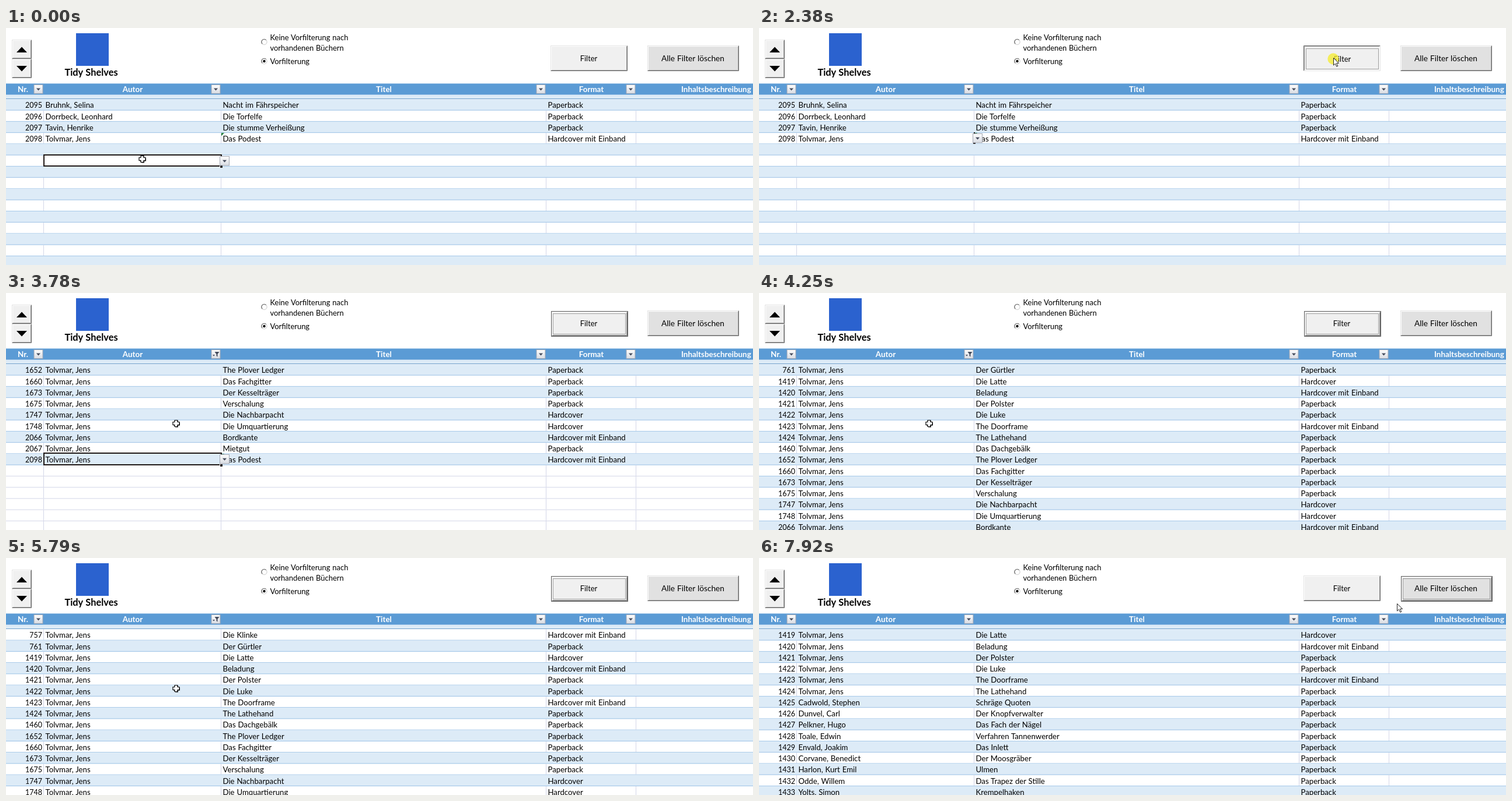
Write an HTML page that moves like this. It is 1280x407 px and loops after 8 s.

```html
<!DOCTYPE html>
<html lang="de">
<head>
<meta charset="utf-8">
<title>Library table</title>
<style>
html, body { margin: 0; width: 100%; height: 100%; overflow: hidden; background: #fff; }
svg { display: block; width: 100vw; height: 100vh; }
text { font: 13.2px Lato, Carlito, sans-serif; fill: #000; word-spacing: .5px; }
.num { font-size: 12.5px; text-anchor: end; }
.label { font-size: 12.95px; }
.head { font-size: 13.4px; font-weight: bold; fill: #fff; }
.mid { text-anchor: middle; }
.brand { font-size: 16.4px; font-weight: bold; }
</style>
</head>
<body>
<svg viewBox="0 0 1280 407" xmlns="http://www.w3.org/2000/svg">
  <defs>
    <linearGradient id="knob" x2="0" y2="1">
      <stop stop-color="#fdfdfd"/><stop offset="1" stop-color="#d9dce3"/>
    </linearGradient>
  </defs>
  <rect width="1280" height="407" fill="#fff"/>
  <g id="table"></g>
  <g id="top"></g>
  <g id="pointer"></g>
</svg>
<script>
const LOOP = 8000;
const COLUMNS = [64, 368, 925, 1079];
const BAND = '#ddebf7', BORDER = '#9bc2e6', GRID = '#d3d6e8';
const P = 'Paperback', H = 'Hardcover', E = 'Hardcover mit Einband';
const AUTHOR = 'Tolvmar, Jens';

const recent = [
  [2095, 'Bruhnk, Selina', 'Nacht im Fährspeicher', P],
  [2096, 'Dorrbeck, Leonhard', 'Die Torfelfe', P],
  [2097, 'Tavin, Henrike', 'Die stumme Verheißung', P],
  [2098, AUTHOR, 'Das Podest', E]
];
const filtered = [
  [630, 'Die Elle', P], [757, 'Die Klinke', E], [761, 'Der Gürtler', P],
  [1419, 'Die Latte', H], [1420, 'Beladung', E], [1421, 'Der Polster', P],
  [1422, 'Die Luke', P], [1423, 'The Doorframe', E], [1424, 'The Lathehand', P],
  [1460, 'Das Dachgebälk', P], [1652, 'The Plover Ledger', P],
  [1660, 'Das Fachgitter', P], [1673, 'Der Kesselträger', P],
  [1675, 'Verschalung', P], [1747, 'Die Nachbarpacht', H],
  [1748, 'Die Umquartierung', H], [2066, 'Bordkante', E],
  [2067, 'Mietgut', P], [2098, 'Das Podest', E]
].map(([nr, title, format]) => [nr, AUTHOR, title, format]);
const cleared = filtered.slice(3, 9).concat([
  ['Cadwold, Stephen', 'Schräge Quoten'],
  ['Dunvel, Carl', 'Der Knopfverwalter'],
  ['Pelkner, Hugo', 'Das Fach der Nägel'],
  ['Toale, Edwin', 'Verfahren Tannenwerder'],
  ['Envald, Joakim', 'Das Inlett'],
  ['Corvane, Benedict', 'Der Moosgräber'],
  ['Harlon, Kurt Emil', 'Ulmen'],
  ['Odde, Willem', 'Das Trapez der Stille'],
  ['Yolts, Simon', 'Krempelhaken']
].map(([author, title], i) => [1425 + i, author, title, P]));

// Each step holds until the next one: [ms, ...values]
const scroll = [[0, 15], [3510, 13], [3610, 11], [3780, 10], [3900, 8], [4120, 5],
  [4250, 2], [4370, 1], [4870, 0], [5790, 1], [5930, 3]];
const pointer = [
  [0, 233, 225], [490, 230, 215], [610, 224, 197], [730, 220, 189],
  [1360, 400, 172], [1470, 640, 136], [1610, 780, 108], [1730, 920, 62],
  [1850, 986, 35, 1], [1970, 984, 51, 1], [2920, 900, 78], [3030, 640, 130],
  [3140, 420, 185], [3250, 320, 212], [3360, 299, 216], [3510, 291, 224],
  [6390, 330, 218], [6510, 560, 180], [6640, 900, 125], [6770, 1090, 86],
  [6890, 1127, 72, 1], [7050, 1130, 63, 1], [7920, 1093, 78, 1]
];
const clicks = [[850, 1000], [2270, 2470], [7410, 7680]];

const at = (steps, t) => steps.filter(s => s[0] <= t).pop();
const within = (t, from, to) => t >= from && t < to;
const line = i => 121.9 + 19.25 * i;
const edge = i => Math.round(line(i) - .5);

const box = (x, y, w, h, fill, extra = '') =>
  `<rect x="${x}" y="${y}" width="${w}" height="${h}" fill="${fill}" ${extra}/>`;
const path = (d, fill, extra = '') => `<path d="${d}" fill="${fill}" ${extra}/>`;
const text = (x, y, s, cls = '') => `<text x="${x}" y="${y}" class="${cls}">${s}</text>`;
const outline = color => `stroke="${color}"`;

function knob(x, y, w, h, funnel) {
  const cx = x + w / 2, cy = y + h / 2;
  const icon = funnel
    ? path(`M${cx - 2} ${cy - 4}h8l-3 4v4.5l-2 -1.5v-3z`, '#444b5c') +
      path(`M${cx - 5.5} ${cy + 1}h4l-2 2.5z`, '#444b5c')
    : path(`M${cx - 3.5} ${cy - 1.5}h7l-3.5 4z`, '#444b5c');
  return box(x, y, w, h, 'url(#knob)', outline('#a3a8b3')) + icon;
}

function bevel(x, y, w, h, fill, sunken) {
  const r = x + w, b = y + h;
  const light = ['#e3e3e3', '#fff'], dark = ['#696969', '#a0a0a0'];
  const [tl, br] = sunken ? [dark, light] : [light, dark];
  const ring = i => {
    const d = i + .5;
    return path(`M${x + d} ${b - d}V${y + d}H${r - d}`, 'none', outline(tl[i])) +
      path(`M${x + d} ${b - d}H${r - d}V${y + d}`, 'none', outline(br[i]));
  };
  return box(x, y, w, h, fill) + ring(0) + ring(1);
}

function button(x, w, label, fill, size, state) {
  const pressed = state === 'pressed', focused = state === 'focus';
  const shift = pressed ? 1 : 0;
  let s = focused
    ? bevel(x + 2, 32, w - 2, 42, fill) + box(x + 1.5, 31.5, w - 1, 43, 'none', outline('#646464'))
    : bevel(x, 30, w, 44, fill, pressed);
  if (state)
    s += box(x + 4.5, 35.5, w - 8, 35, 'none', 'stroke="#555" stroke-dasharray="1 1"');
  return s + `<text x="${x + w / 2 - .5 + shift}" y="${57 + shift}" class="mid" style="font-size:${size}px">${label}</text>`;
}

function radio(y, on) {
  return `<circle cx="442.5" cy="${y}" r="4.6" fill="#fff" stroke="#c8c8c8"/>` +
    path(`M439.2 ${y + 3.3}A4.6 4.6 0 0 1 445.8 ${y - 3.3}`, 'none', 'stroke="#666" stroke-width="1.2"') +
    (on ? `<circle cx="442.5" cy="${y}" r="2.2" fill="#000"/>` : '');
}

function drawTop(t) {
  const filterOn = within(t, 2470, 7680);
  const filterState = within(t, 2380, 2470) ? 'pressed' : within(t, 2470, 7530) ? 'focus' : '';
  const clearState = within(t, 7530, 7680) ? 'pressed' : t >= 7680 ? 'focus' : '';
  return bevel(10, 20, 34, 33, '#f0f0f0') + path('M18 42L27 32.5L36 42z', '#000') +
    bevel(10, 53, 34, 33, '#f0f0f0') + path('M18 65H36L27 74.5z', '#000') +
    box(120, 9, 56, 56, '#2b62cf') +
    text(146, 82, 'Tidy Shelves', 'brand mid') +
    radio(24, false) + radio(57, true) +
    text(452.5, 21, 'Keine Vorfilterung nach', 'label') +
    text(452.5, 39, 'vorhandenen Büchern', 'label') +
    text(452.5, 62, 'Vorfilterung', 'label') +
    button(933, 132, 'Filter', '#f0f0f0', 12.9, filterState) +
    button(1099, 157, 'Alle Filter löschen', '#e1e1e1', 13.7, clearState) +
    box(0, 95, 1280, 20, '#5b9bd5') + box(0, 95, 1280, 1, BORDER) +
    box(0, 115, 1280, 6, BAND) + box(0, 114, 1280, 1, BORDER) + box(0, 121, 1280, 1, '#6f9fcb') +
    [['Nr.', 29], ['Autor', 217], ['Titel', 647.5], ['Format', 1003]]
      .map(([s, x]) => text(x, 110, s, 'head mid')).join('') +
    text(1157, 110, 'Inhaltsbeschreibung', 'head') +
    [55.5, 359.5, 916.5, 1070.5]
      .map((x, i) => knob(x - 7.5, 97.5, 15, 15, i === 1 && filterOn)).join('');
}

function drawRow(i, cells, banded, plain) {
  const y = line(i) + .5, end = line(i + 1) - .5, base = edge(i) + 15.5;
  let s = banded ? box(0, y, 1280, end - y + .5, BAND)
    : COLUMNS.map(x => box(x, y, 1, end - y, GRID)).join('');
  s += box(0, end, 1280, 1, plain ? GRID : BORDER);
  if (!cells) return s;
  const [nr, author, title, format] = cells;
  if (nr === 2098) s += path(`M369 ${y}h5l-5 5z`, '#1e7a34');
  return s + text(62, base, nr, 'num') + text(67.5, base, author) +
    text(371.5, base, title) + text(928.5, base, format);
}

function drawSelection(row, framed) {
  const a = edge(row), b = edge(row + 1), dark = '#211a18';
  const frame = framed
    ? box(65, a, 304, b - a, 'none', `stroke="${dark}" stroke-width="2"`) +
      box(366, b - 2, 5, 5, '#fff') + box(367, b - 1, 4, 4, dark)
    : box(367, b - 2, 4, 3, dark) + box(368, a, 2, 2, dark);
  return frame + knob(366.5, a + 2.5, 16, 15.5);
}

function drawTable(t) {
  const isFiltered = within(t, 2470, 7680);
  const first = isFiltered ? at(scroll, t)[1] : 0;
  const rows = t < 2470 ? recent : isFiltered ? filtered.slice(first) : cleared;
  let s = '';
  for (let i = 0; i < 15; i++) {
    const plain = isFiltered && i >= rows.length;
    s += drawRow(i, rows[i], !plain && (i + first) % 2 === 0, plain);
  }
  const selected = t < 850 ? 5 : t < 2470 ? 3 : isFiltered ? 18 - first : 15;
  return selected < 15 ? s + drawSelection(selected, !within(t, 2380, 2470)) : s;
}

function drawPointer(t) {
  const [, x, y, arrow] = at(pointer, t);
  const click = clicks.some(([a, b]) => within(t, a, b));
  const halo = click
    ? `<circle cx="${x}" cy="${y + (arrow ? 2 : 0)}" r="9.7" fill="#f5ec32" fill-opacity=".78"/>` : '';
  const shape = arrow
    ? path('M.5 .5V13L3.5 10.2L5.8 15.2L7.8 14.3L5.6 9.4H9.6z', '#fff', 'stroke="#222" stroke-linejoin="round"')
    : path('M-1 -4.5h5v3h3v5h-3v3h-5v-3h-3v-5h3z', '#000') +
      path('M-2 -5.5h5v3h3v5h-3v3h-5v-3h-3v-5h3z', '#fff', 'stroke="#000" stroke-width="1.2"');
  return halo + `<g transform="translate(${x} ${y})">${shape}</g>`;
}

const layers = { table: drawTable, top: drawTop, pointer: drawPointer };
const shown = {};

function render(t) {
  for (const id in layers) {
    const markup = layers[id](t);
    if (markup === shown[id]) continue;
    shown[id] = markup;
    document.getElementById(id).innerHTML = markup;
  }
}

const start = performance.now();
function tick() {
  render((performance.now() - start) % LOOP);
  requestAnimationFrame(tick);
}
tick();
</script>
</body>
</html>
```
